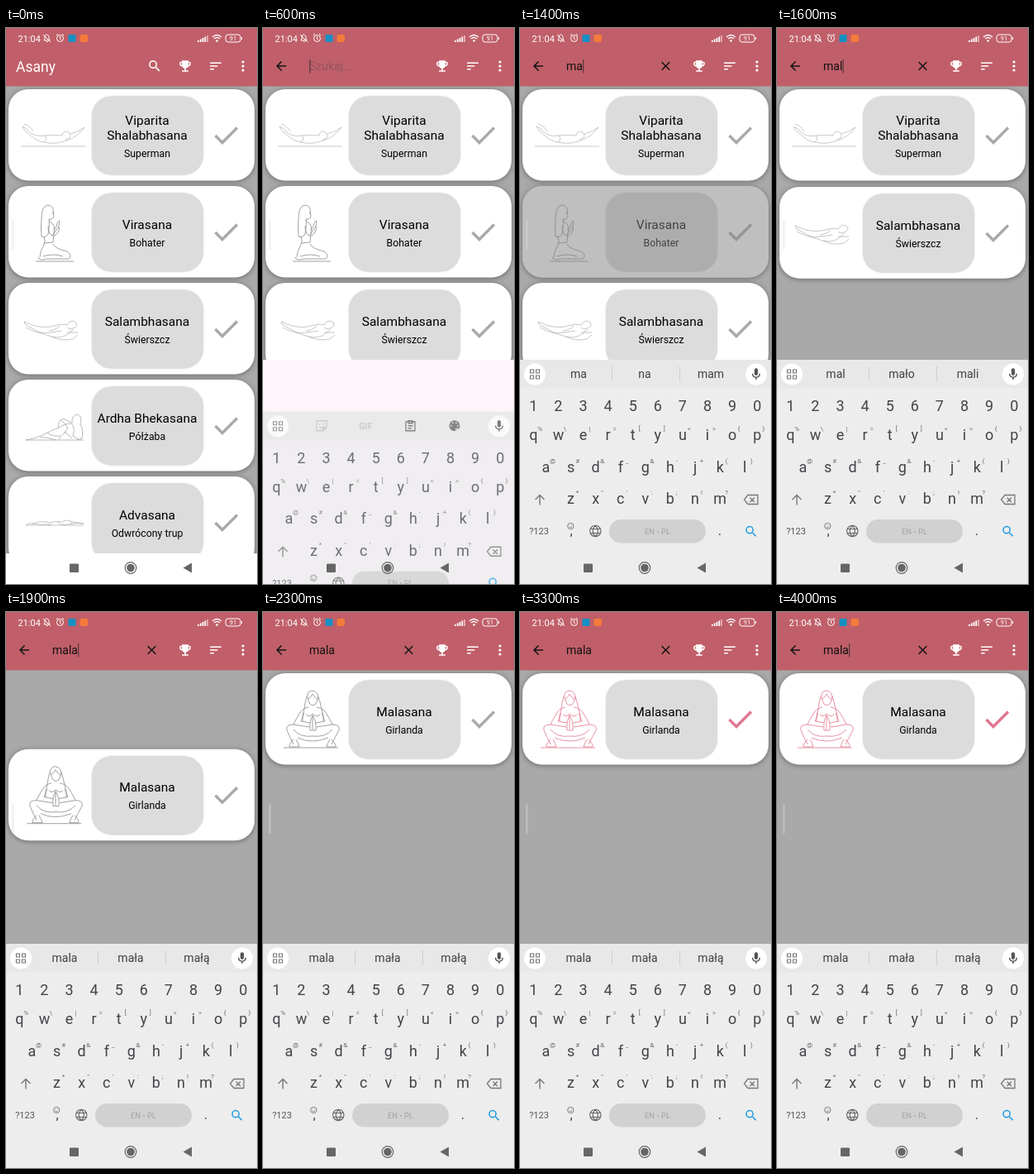
Recreate the animation shown at these times as an HTML page with a canvas. Size 304 by 672 pixels, loop 4100 ms.

```html
<!DOCTYPE html>
<html lang="pl">
<head>
<meta charset="utf-8">
<title>Asany</title>
<style>
html, body { margin: 0; width: 100%; height: 100%; overflow: hidden; background: #a9a9a9; }
canvas { display: block; width: 304px; height: 672px; }
</style>
</head>
<body>
<canvas></canvas>
<script>
const canvas = document.querySelector('canvas');
const c = canvas.getContext('2d');
const dpr = window.devicePixelRatio || 1;
canvas.width = 304 * dpr;
canvas.height = 672 * dpr;

const LOOP = 4100, SLOT = 117, FIRST = 74, KEYBOARD_TOP = 401;
const GREY = [169, 169, 169], LINE = [138, 138, 138], PINK = [224, 118, 143];

// Filled glyphs on a 24 unit grid
const ICON = {
  search: 'M15.5 14h-.8l-.3-.3A6.5 6.5 0 1 0 13.7 14.4l.3.3v.8l5 5L20.5 19zM9.5 14a4.5 4.5 0 1 1 0-9a4.5 4.5 0 0 1 0 9z',
  back: 'M20 11H7.8l5.6-5.6L12 4l-8 8 8 8 1.4-1.4L7.8 13H20z',
  close: 'M19 6.4L17.6 5 12 10.6 6.4 5 5 6.4 10.6 12 5 17.6 6.4 19 12 13.4 17.6 19 19 17.6 13.4 12z',
  trophy: 'M19 5h-2V3H7v2H5a2 2 0 0 0-2 2v1a5 5 0 0 0 4.4 4.9A5 5 0 0 0 11 15.9V19H7v2h10v-2h-4v-3.1a5 5 0 0 0 3.6-3A5 5 0 0 0 21 8V7a2 2 0 0 0-2-2zM5 8V7h2v3.8A3 3 0 0 1 5 8zM19 8a3 3 0 0 1-2 2.8V7h2z',
  sort: 'M3 18h6v-2H3zM3 6v2h18V6zM3 13h12v-2H3z',
  mic: 'M12 14a3 3 0 0 0 3-3V5a3 3 0 0 0-6 0v6a3 3 0 0 0 3 3zM17 11a5 5 0 0 1-10 0H5a7 7 0 0 0 6 6.9V21h2v-3.1A7 7 0 0 0 19 11z'
};

// Line drawings with their pen width, y measured from the top of the card
const POSES = {
  superman: {
    title: ['Viparita', 'Shalabhasana'], sub: 'Superman', pen: .45,
    art: 'M20 45Q26 47 29 52Q36 58 47 56Q57 55 68 56M78 54Q87 52 95 46M20 45Q22 51 29 55Q37 63 46 64Q58 67 70 63Q86 59 95 46M22 42Q29 44 33 51M47 56Q51 60 46 64M68 56A5 5 0 1 1 77 59L72 61M18 69H96'
  },
  hero: {
    title: ['Virasana'], sub: 'Bohater', pen: .8,
    art: 'M57 34Q59 23 50 23Q43 25 43 39Q42 52 43 61Q48 63 51 58Q53 46 52 40Q57 41 58 36L57 31M52 42Q58 45 59 52Q57 61 57 68M46 61Q48 67 46 71Q41 79 41 86M46 69L57 68M51 48Q51 58 56 60L64 49L65 42Q62 42 61 49L57 53M64 49Q66 55 58 61M57 70Q60 76 74 79Q81 84 76 88H50Q40 91 39 86M45 85Q57 81 69 85M36 91H82'
  },
  cricket: {
    title: ['Salambhasana'], sub: 'Świerszcz', pen: .5,
    art: 'M22 47Q29 50 35 52Q49 55 58 52Q69 49 74 51Q79 43 85 48Q88 53 81 55Q77 57 74 54M22 47Q22 51 28 53Q42 62 55 65Q68 68 76 61L82 56M24 54Q40 63 53 60L67 58M65 52Q61 57 52 58M56 65Q66 71 81 68L87 63M74 60L87 60'
  },
  frog: {
    title: ['Ardha Bhekasana'], sub: 'Półżaba', pen: .6,
    art: 'M24 73Q35 71 42 68Q54 62 64 58Q70 53 80 53Q79 43 87 42Q93 45 90 54Q94 60 92 71L86 73M24 73H94M41 69Q52 70 60 73M64 58Q62 50 69 47L79 52M66 49Q72 52 75 59L64 72M80 54Q84 59 81 68L88 72M70 63Q76 66 80 71M50 64Q55 69 66 68'
  },
  corpse: {
    title: ['Advasana'], sub: 'Odwrócony trup', pen: .5,
    art: 'M24 59Q26 56 32 57Q43 53 53 56Q61 53 68 55Q74 51 80 55L94 57M24 59H94M32 57Q43 59 55 58M62 55Q68 60 76 58Q82 57 79 54M78 58Q86 55 94 57'
  },
  garland: {
    title: ['Malasana'], sub: 'Girlanda', pen: .8,
    art: 'M55 33Q51 23 59 21Q69 22 66 33Q64 39 60 39Q56 38 55 33M55 31Q58 29 60 25Q63 30 66 32M53 28Q51 34 50 43Q47 52 48 58M67 28Q69 34 71 43Q74 52 73 58M55 41Q47 43 44 49Q39 57 37 62L56 65M65 41Q74 43 77 49Q82 57 84 62L65 65M50 48L46 58L57 60M71 48L75 58L64 60M60 51Q56 58 57 69H64Q65 58 60 51V68M52 50Q56 54 60 49Q65 54 69 50M37 62Q27 62 29 69Q33 78 37 86M84 62Q94 62 92 69Q87 78 83 86M37 68Q45 78 60 76Q75 78 84 68M42 78Q59 86 79 78M37 80Q31 86 32 89H44Q43 85 40 80M83 80Q89 86 88 89H77Q78 85 81 80M25 90H91'
  }
};

const clamp = v => Math.max(0, Math.min(1, v));
const progress = (t, start, length) => clamp((t - start) / length);
const ease = p => (1 - Math.cos(Math.PI * p)) / 2;
const mix = (a, b, p) => `rgb(${a.map((v, i) => Math.round(v + (b[i] - v) * p))})`;

function text(s, x, y, size, color, align = 'center', weight = 400) {
  c.font = `${weight} ${size}px Roboto, sans-serif`;
  c.textAlign = align;
  c.fillStyle = color;
  c.fillText(s, x, y);
}

function rect(x, y, w, h, color, r = 0) {
  c.beginPath();
  c.roundRect(x, y, w, h, r);
  c.fillStyle = color;
  c.fill();
}

function disc(x, y, r, color) {
  c.beginPath();
  c.arc(x, y, r, 0, 7);
  c.fillStyle = color;
  c.fill();
}

function line(d, color, width = 1) {
  c.strokeStyle = color;
  c.lineWidth = width;
  c.stroke(new Path2D(d));
}

function icon(name, x, y, color, scale = .76) {
  c.save();
  c.translate(x, y);
  c.scale(scale, scale);
  c.translate(-12, -12);
  c.fillStyle = color;
  c.fill(new Path2D(ICON[name]), 'evenodd');
  c.restore();
}

function card(name, top, alpha = 1, marked = 0) {
  const pose = POSES[name];
  c.save();
  c.translate(0, top);
  c.shadowColor = 'rgba(0,0,0,.38)';
  c.shadowBlur = 6 * dpr;
  c.shadowOffsetY = dpr;
  rect(3, 0, 298, 110.6, '#fff', 24);
  c.shadowColor = 'rgba(0,0,0,.2)';
  c.shadowBlur = 2 * dpr;
  c.shadowOffsetY = 0;
  rect(104, 8.5, 135, 95, '#dcdcdc', 24);
  c.shadowColor = 'transparent';
  line(pose.art, mix(LINE, PINK, marked), pose.pen);
  const shift = pose.title.length > 1 ? 9 : 0;
  pose.title.forEach((s, i) => text(s, 171, 51.5 - shift + 18 * i, 15.5, '#000'));
  text(pose.sub, 171, 72.8 + shift, 12.3, '#000');
  line('M253.5 56L262 64.5L280 46.5', mix(GREY, PINK, marked), 3.4);
  // A fading card lets the shadow beneath it show through
  if (alpha < 1) rect(3, 0, 298, 110.6, `rgba(130,130,130,${1 - alpha})`, 24);
  c.restore();
}

function cards(t) {
  const slot = i => FIRST + SLOT * i;
  const slide = (from, start, length) => slot(from - ease(progress(t, start, length)));
  if (t < 1460) {
    const gone = progress(t, 1340, 120);
    ['superman', 'hero', 'cricket', 'frog', 'corpse'].forEach((name, i) =>
      card(name, slot(i), name === 'hero' ? 1 - gone : 1));
    return;
  }
  if (t < 1820) card('superman', slot(0), 1 - progress(t, 1720, 100));
  if (t < 1710) card('cricket', slide(2, 1460, 150), 1 - progress(t, 1610, 100));
  if (t >= 1610) {
    const top = t < 1824 ? slide(2, 1610, 120) : slide(1, 1824, 250);
    card('garland', top, 1, progress(t, 2700, 250));
  }
}

function statusBar() {
  text('21:04', 14.5, 16.5, 11, '#fff', 'left');
  line('M46 15H53L52 13V10Q49 6 47 10V13ZM45 8L54 17M49 16.5H50.5', '#fff');
  line('M69.5 12.5A4 4 0 1 1 61.5 12.5A4 4 0 1 1 69.5 12.5M65.5 10V13L67 14M61 9L63 7M70 9L68 7', '#fff');
  rect(75.5, 8, 9, 9, '#168fc2', 1);
  rect(89.5, 8, 9.5, 9, '#f47a3a', 2);
  for (let i = 0; i < 5; i++) rect(232 + 2.8 * i, 15 - 1.5 * i, 1.8, 2 + 1.5 * i, i < 4 ? '#fff' : '#e5b0b5');
  line('M250 11Q255.5 6 261 11M252 13Q255.5 10 259 13', '#fff', 1.3);
  disc(255.5, 15.5, 1.3, '#fff');
  c.beginPath();
  c.roundRect(266, 8, 18, 9, 3);
  c.strokeStyle = '#fff';
  c.lineWidth = 1;
  c.stroke();
  rect(285, 11, 1, 3, '#fff');
  text('91', 275, 15.3, 7.5, '#fff');
}

const typed = t => 'mala'.slice(0, [1000, 1300, 1550, 1750].filter(at => t >= at).length);

function header(t) {
  rect(0, 0, 304, 70.5, '#c05f69');
  statusBar();
  if (t < 300) {
    text('Asany', 12, 52.5, 17.5, '#fff', 'left');
    icon('search', 180, 46, '#fff');
  } else {
    const query = typed(t);
    icon('back', 22, 46, '#151515');
    text(query || 'Szukaj…', 56, 51, 14, query ? '#111' : '#92565e', 'left');
    const cursorOn = t < 2200 || (t >= 2700 && t < 3200) || t >= 3700;
    if (cursorOn) rect(56.3 + (query ? c.measureText(query).width : 0), 38, 1, 16.5, '#3d3034');
    if (query) icon('close', 176.5, 46, '#151515');
  }
  icon('trophy', 217, 46, '#fff');
  icon('sort', 254, 46, '#fff');
  for (const y of [41, 46, 51]) disc(287, y, 1.6, '#fff');
}

function keyRow(keys, hints, x, y) {
  [...keys].forEach((key, i) => {
    const kx = x + 30.1 * i;
    text(key, kx, y + 6, 18, '#424448');
    if (hints) text(hints[i], kx + 8, y - 5, 8, '#6c6c6c');
  });
}

function tools() {
  line('M65 412H77V420L73 424H65ZM77 420H73V424M68 416H69M73 416H74M68 419Q71 422 74 419', '#c3c3c3', 1.3);
  text('GIF', 124.5, 422, 11, '#c3c3c3', 'center', 700);
  line('M173 413H184V424H173ZM176 412H181V415H176ZM175.5 418H181.5M175.5 421H180', '#666', 1.3);
  disc(232, 418, 6.5, '#666');
  for (const [x, y] of [[228, 418], [230, 414.5], [234, 414.5], [236, 418]]) disc(x, y, 1.1, '#e8e8e8');
  disc(235, 423, 2.3, '#e8e8e8');
}

const SUGGESTIONS = {
  m: ['m', 'mam', 'mnie'], ma: ['ma', 'na', 'mam'],
  mal: ['mal', 'mało', 'mali'], mala: ['mala', 'mała', 'małą']
};

function keyboard(t) {
  if (t < 500) return;
  rect(0, KEYBOARD_TOP, 304, 271, '#fdf5fa');
  c.save();
  c.globalAlpha = progress(t, 500, 135);
  c.translate(0, 270 * Math.pow(1 - progress(t, 500, 250), 2.82));
  rect(0, KEYBOARD_TOP, 304, 300, '#ededed');
  rect(0, KEYBOARD_TOP, 304, 34.5, '#e8e8e8');

  const words = SUGGESTIONS[typed(t)];
  if (words) {
    words.forEach((word, i) => text(word, 71 + 80 * i, 423, 14, '#3f4145'));
    for (const x of [111, 193]) rect(x, 409, 1, 18, '#cfcfcf');
  } else tools();
  disc(18, 418.5, 13, '#fff');
  line('M12.5 413H16.5V417H12.5ZM19.5 413H23.5V417H19.5ZM12.5 420H16.5V424H12.5ZM19.5 420H23.5V424H19.5Z', '#777', 1.2);
  disc(286, 418.5, 13, '#fff');
  icon('mic', 286, 418.5, '#555', .72);

  keyRow('1234567890', '', 16.3, 457);
  keyRow('qwertyuiop', '%\\|=[]<>{}', 16.3, 492);
  keyRow('asdfghjkl', '@#&_&-+()', 31.5, 530.5);
  keyRow('zxcvbnm', '*"\':;!?', 61.5, 569);

  line('M18.5 570L24 564.5L29.5 570M24 565V576.5', '#777', 1.4);
  line('M276 564.5H288V575.5H276L271.5 570ZM278.5 567.5L284 573M284 567.5L278.5 573', '#777', 1.3);
  text('?123', 23, 612, 11, '#55575b');
  line('M65 602A3.7 3.7 0 1 1 57.6 602A3.7 3.7 0 1 1 65 602M59.5 603Q61.3 605 63 603M60 600.5V601.2M62.8 600.5V601.2', '#777', .9);
  text(',', 62, 613, 16, '#424448');
  line('M98 608A6.7 6.7 0 1 1 84.6 608A6.7 6.7 0 1 1 98 608M91.3 601.3Q85 608 91.3 614.7Q97.6 608 91.3 601.3M85.5 605.5H97M85.5 610.5H97', '#666', 1.1);
  rect(108, 594, 117, 28.5, '#d1d1d1', 14.2);
  text('EN • PL', 166.5, 611.5, 9.5, '#a2a2a2');
  text('.', 242, 613, 17, '#424448');
  icon('search', 280, 608.5, '#1a9be0', .74);
  c.restore();
}

function navigation(t) {
  if (t < 500) rect(0, 635, 304, 37, '#fff');
  rect(77, 647.5, 11, 10.5, '#666', 1);
  disc(151, 652.5, 4.8, '#666');
  c.beginPath();
  c.arc(151, 652.5, 6.8, 0, 7);
  c.strokeStyle = '#666';
  c.lineWidth = 1.2;
  c.stroke();
  c.fillStyle = '#666';
  c.fill(new Path2D('M214.5 652.5L225 646.5V658.5Z'));
}

function draw(now) {
  const t = now % LOOP;
  c.setTransform(dpr, 0, 0, dpr, 0, 0);
  rect(0, 0, 304, 672, '#a9a9a9');
  cards(t);
  rect(7, 232, 2.6, 36, 'rgba(220,220,220,.4)', 1.3);
  header(t);
  keyboard(t);
  navigation(t);
}

const start = performance.now();
function tick() {
  draw(performance.now() - start);
  requestAnimationFrame(tick);
}
tick();
</script>
</body>
</html>
```
